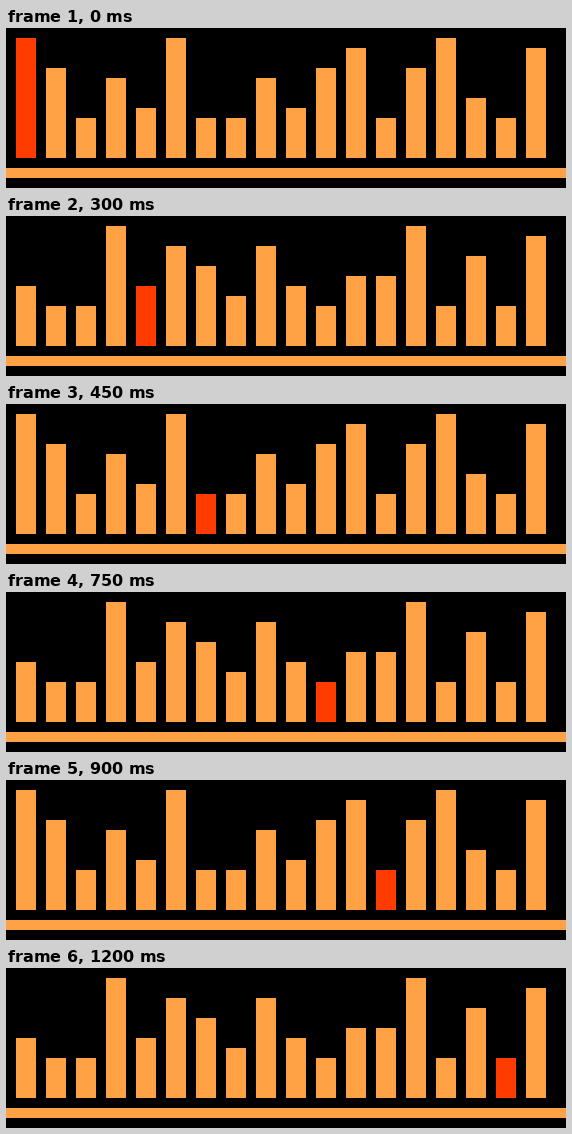
These frames come from a looping animation (560x160 px, 1350 ms). An HTML page with a canvas:

```html
<!DOCTYPE html>
<html>
<head>
<meta charset="utf-8">
<style>
  html, body { margin: 0; width: 100%; height: 100%; overflow: hidden; background: #000; }
  canvas { display: block; }
</style>
</head>
<body>
<canvas width="560" height="160"></canvas>
<script>
const ctx = document.querySelector('canvas').getContext('2d');
const STEP = 150, STEPS = 9, UNIT = 10, BASE = 130;
const ORANGE = '#ffa245', RED = '#ff3c00';

// Bar heights in units; the three poses repeat in turn
const poses = [
  [12, 9, 4, 8, 5, 12, 4, 4, 8, 5, 9, 11, 4, 9, 12, 6, 4, 11],
  [7, 11, 12, 4, 4, 7, 6, 8, 4, 12, 7, 4, 9, 5, 8, 4, 12, 7],
  [6, 4, 4, 12, 6, 10, 8, 5, 10, 6, 4, 7, 7, 12, 4, 9, 4, 11]
];

function draw(step) {
  ctx.fillStyle = '#000';
  ctx.fillRect(0, 0, 560, 160);
  ctx.fillStyle = ORANGE;
  ctx.fillRect(0, 140, 560, 10);
  poses[step % poses.length].forEach((units, i) => {
    const h = units * UNIT;
    ctx.fillStyle = i === step * 2 ? RED : ORANGE;
    ctx.fillRect(10 + i * 30, BASE - h, 20, h);
  });
}

const start = performance.now();
function tick() {
  const t = performance.now() - start;
  draw(Math.floor(t / STEP) % STEPS);
  requestAnimationFrame(tick);
}
tick();
</script>
</body>
</html>
```
